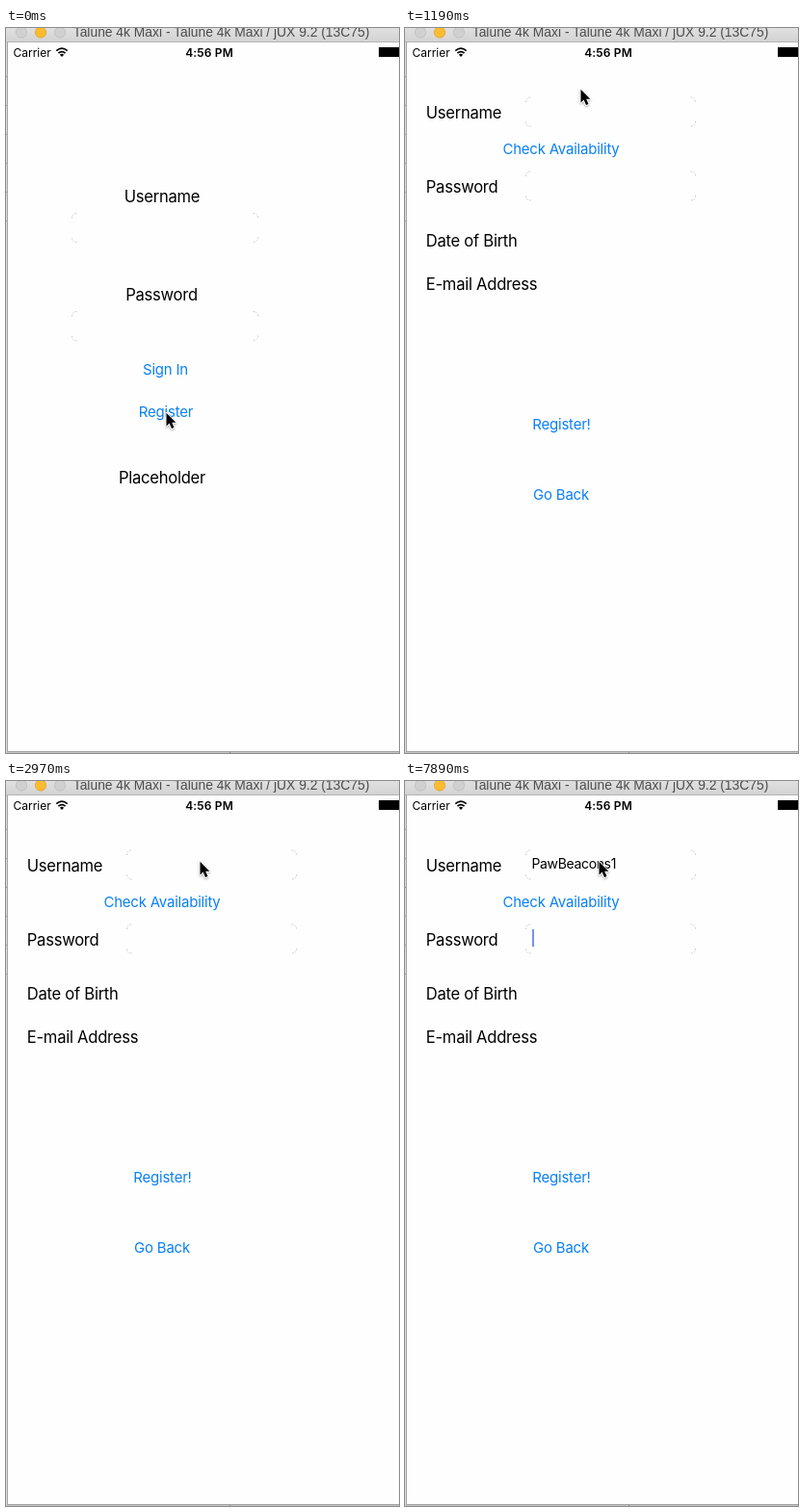
Recreate the animation shown at these times as an HTML page. Size 408 by 753 pixels, loop 8 s.

```html
<!DOCTYPE html>
<html lang="en">
<head>
<meta charset="utf-8">
<title>Sign-up form</title>
<style>
  html, body { margin: 0; width: 100%; height: 100%; overflow: hidden; background: #fefefe; }
  svg { display: block; width: 408px; height: 753px; }
  text { font-family: Inter, Roboto, sans-serif; white-space: pre; }
  .label { font-size: 16.6px; letter-spacing: -.27px; }
  .button { font-size: 15px; letter-spacing: -.22px; fill: #0a80f6; }
  .entry { font-size: 14px; letter-spacing: -.35px; }
  .status { font-size: 12px; }
  .time { font-weight: 600; letter-spacing: .15px; }
  .title { font: 13.85px "Liberation Sans", Arial, sans-serif; fill: #4c4c4c; }
  .mid { text-anchor: middle; }
  .field { fill: none; stroke: #b9b9b9; stroke-width: .8; stroke-dasharray: 1.5 1.5; }
</style>
</head>
<body>
<svg viewBox="0 0 408 753">
  <defs>
    <linearGradient id="bar" x2="0" y2="1">
      <stop stop-color="#e0e0e0"/><stop offset="1" stop-color="#d3d3d3"/>
    </linearGradient>
    <filter id="soft" x="-60%" y="-40%" width="220%" height="200%">
      <feDropShadow dx="0" dy="1" stdDeviation=".9" flood-opacity=".4"/>
    </filter>
    <clipPath id="screen"><rect x="2" y="15" width="406" height="736"/></clipPath>
  </defs>
  <rect width="408" height="753" fill="#fefefe"/>

  <g clip-path="url(#screen)">
    <g id="login"></g>
    <g id="sheet"><rect x="2" width="406" height="753" fill="#fefefe"/></g>
  </g>

  <g id="statusBar">
    <text class="status" x="7.5" y="30">Carrier</text>
    <path d="M52.3 23.6Q58 18.6 63.7 23.6M54.4 26.2Q58 23 61.6 26.2" fill="none" stroke="#000" stroke-width="1.7"/>
    <path d="M58 30L55.9 27.7Q58 26 60.1 27.7Z"/>
    <text class="status time mid" x="211" y="30">4:56 PM</text>
    <rect x="387" y="20" width="21" height="10"/>
  </g>

  <g id="frame">
    <rect width="408" height="14" fill="url(#bar)"/>
    <rect y="14" width="408" height="1" fill="#b4b4b4"/>
    <g stroke-width=".8" fill="#d0d0d0" stroke="#bcbcbc">
      <circle cx="16" cy="4.5" r="5.6"/>
      <circle cx="36" cy="4.5" r="5.6" fill="#fdbc2f" stroke="#dfa023"/>
      <circle cx="56" cy="4.5" r="5.6"/>
    </g>
    <text class="title mid" x="223.5" y="9">Talune 4k Maxi - Talune 4k Maxi / jUX 9.2 (13C75)</text>
    <rect y="15" width="1" height="738" fill="#dcdcdc"/>
    <rect x="1" y="15" width="1" height="738" fill="#a6a6a6"/>
    <path d="M.5 50V201" stroke="#a0a0a0" stroke-dasharray="1 29"/>
    <rect x="1" y="751" width="407" height="1" fill="#a2a2a2"/>
    <rect y="752" width="408" height="1" fill="#c4c4c4"/>
    <rect x="232" y="752" width="1" height="1" fill="#808080"/>
  </g>

  <g id="pointer" filter="url(#soft)">
    <path d="M.5 .8V14.4L3.6 11.6L6 17.1L8.5 16L6.2 10.7H10.4Z" stroke="#fff" stroke-width="1.6" stroke-linejoin="round" paint-order="stroke"/>
  </g>
</svg>
<script>
const LOOP = 8000, STEP = 148.4;
const ENTRY = "PawBeacons1";
const SLIDE = 140, FOCUS = 2070, TYPING = 5040, LEAVE = 7260, PASSWORD = 7400;
const KEY_START = 5190, KEY_GAP = 190, BLINK = 1010;

const byId = id => document.getElementById(id);
const clamp = v => Math.min(1, Math.max(0, v));

function add(parent, tag, attrs, content = "") {
  const el = document.createElementNS("http://www.w3.org/2000/svg", tag);
  for (const key in attrs) el.setAttribute(key, attrs[key]);
  el.textContent = content;
  return parent.appendChild(el);
}
const write = (parent, kind, x, y, content) => add(parent, "text", { class: kind, x, y }, content);

// Only the rounded corners of a field are visible.
function field(parent, x, y, w) {
  const r = x + w, b = y + 30;
  add(parent, "path", { class: "field", d:
    `M${x} ${y + 5}Q${x} ${y} ${x + 5} ${y}M${r - 5} ${y}Q${r} ${y} ${r} ${y + 5}` +
    `M${r} ${b - 5}Q${r} ${b} ${r - 5} ${b}M${x + 5} ${b}Q${x} ${b} ${x} ${b - 5}` });
}

const login = byId("login"), sheet = byId("sheet"), pointer = byId("pointer");

write(login, "label mid", 162, 181, "Username");
field(login, 68.5, 192.5, 193);
write(login, "label mid", 161.5, 283, "Password");
field(login, 68.5, 294.5, 193);
write(login, "button mid", 165.5, 359.5, "Sign In");
write(login, "button mid", 166, 403.5, "Register");
write(login, "label mid", 162, 473, "Placeholder");

write(sheet, "label", 21.8, 93.5, "Username");
field(sheet, 125.5, 72, 176);
write(sheet, "button mid", 162, 130.5, "Check Availability");
write(sheet, "label", 21.8, 170.5, "Password");
field(sheet, 125.5, 149, 176);
write(sheet, "label", 21.8, 227, "Date of Birth");
write(sheet, "label", 21.8, 272, "E-mail Address");
write(sheet, "button mid", 162.5, 416.5, "Register!");
write(sheet, "button mid", 162, 489.5, "Go Back");
const entry = write(sheet, "entry", 131.5, 91, "");
const caret = add(sheet, "rect", { width: 2, height: 18, fill: "#4370e6" });

// Pointer key points: time, x, y.
const stops = [
  [0, 166, 399], [590, 185, 407], [1040, 186, 37], [1340, 178, 90],
  [1630, 203, 72], [2070, 213, 78], [2670, 99, 127], [2960, 201, 83]
];

function pointerAt(t) {
  const i = stops.findIndex(stop => stop[0] > t);
  if (i < 0) return stops.at(-1).slice(1);
  const [t0, x0, y0] = stops[i - 1], [t1, x1, y1] = stops[i];
  const u = (t - t0) / (t1 - t0), k = u * u * (3 - 2 * u);
  return [x0 + (x1 - x0) * k, y0 + (y1 - y0) * k];
}

// Critically damped spring from below the screen to rest.
function sheetOffset(t) {
  const u = Math.max(0, t - SLIDE) * .0185;
  return Math.round(738 * (1 + u) * Math.exp(-u));
}

function caretAlpha(t) {
  if (t < FOCUS || (t >= LEAVE && t < PASSWORD)) return 0;
  if (t >= TYPING && t < LEAVE) return 1;
  const phase = (t - (t < TYPING ? FOCUS : PASSWORD)) % BLINK;
  return clamp((600 - phase) / 180);
}

const start = performance.now();
function draw(now) {
  const elapsed = Math.max(0, now - start) % LOOP;
  const t = Math.floor((elapsed + 6) / STEP) * STEP;
  const [x, y] = pointerAt(t).map(Math.round);
  const count = t < KEY_START ? 0 : Math.floor((t - KEY_START) / KEY_GAP) + 1;
  const inPassword = t >= LEAVE;

  sheet.setAttribute("transform", `translate(0 ${sheetOffset(t)})`);
  pointer.setAttribute("transform", `translate(${x} ${y})`);
  entry.textContent = ENTRY.slice(0, count);
  const width = count && !inPassword ? Math.round(entry.getComputedTextLength()) : 0;
  caret.setAttribute("x", 132 + width);
  caret.setAttribute("y", inPassword ? 154 : 77);
  caret.setAttribute("opacity", caretAlpha(t));
  requestAnimationFrame(draw);
}
draw(start);
</script>
</body>
</html>
```
